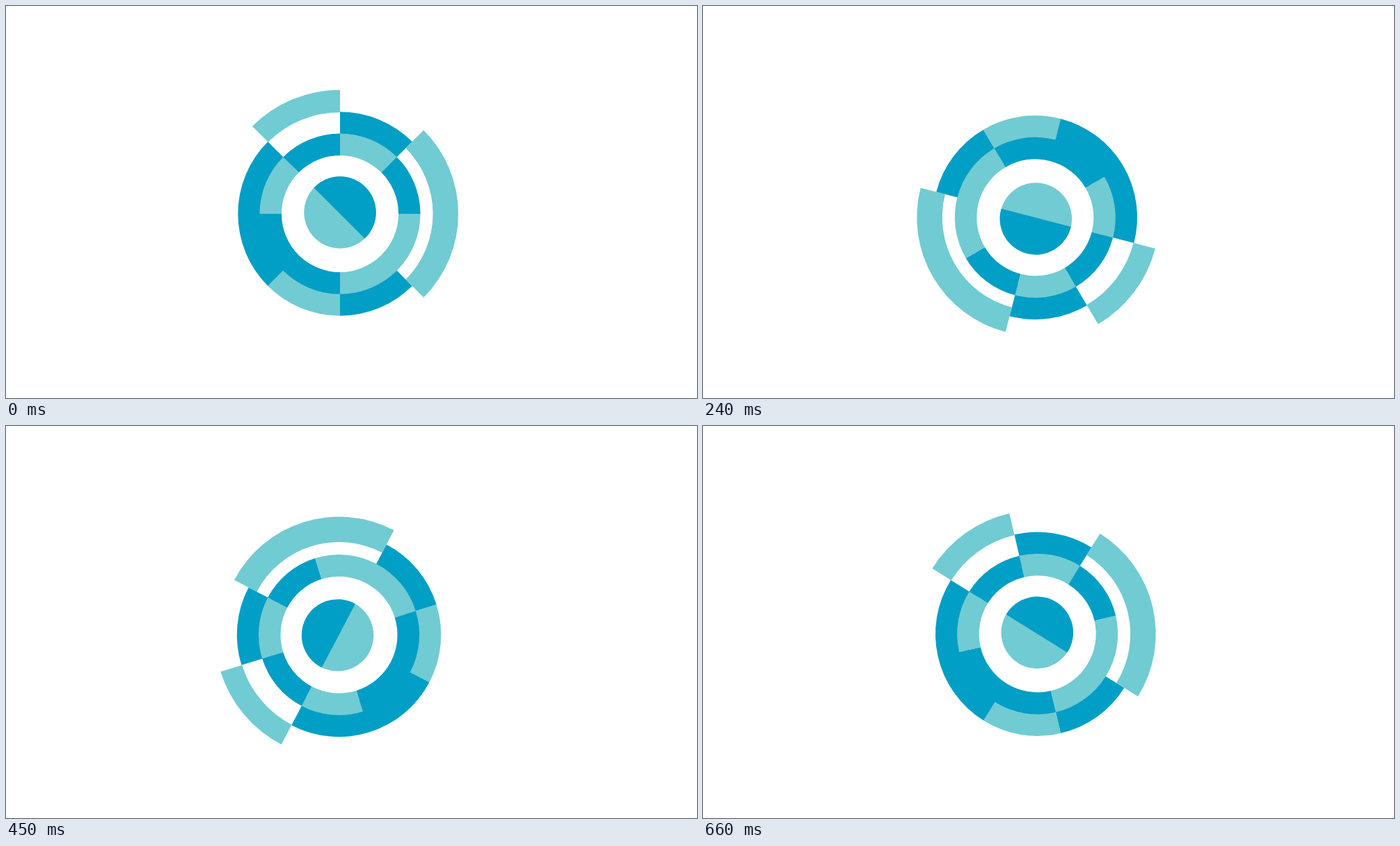
Write an HTML page with a canvas that moves like this. It is 993 px wide and 564 px high and loops after 0.69 s.

```html
<!DOCTYPE html>
<html lang="en">
<head>
<meta charset="utf-8">
<title>Spinning wheel</title>
<style>
  html, body { margin: 0; width: 100%; height: 100%; overflow: hidden; background: #fff; }
  canvas { display: block; }
</style>
</head>
<body>
<canvas width="993" height="564"></canvas>
<script>
const ctx = document.querySelector('canvas').getContext('2d');
const COLORS = { D: '#019ec6', L: '#71cbd2' };
const STEP = 30, STEPS = 23;
const HUB = { x: 480, y: 299 };

// Eight sectors clockwise from the top: D dark, L light, dot empty
const OUTER_RING = 'D..DLDD.';
const INNER_RING = 'LDLLDDLD';

// The wheel wobbles as it turns: step, rotation in degrees, hub offset x and y
const keys = [
  [0, 0, 0, 0],
  [3, 50.8, -0.8, -0.5],
  [6, 118.3, -0.5, 5.8],
  [11, 196.3, -6, 4.5],
  [15, 252.7, -1.5, 1.5],
  [18, 290.1, -8.4, 0.5],
  [22, 346.9, 0.7, 0.2],
  [STEPS, 360, 0, 0]
];

const rad = deg => deg * Math.PI / 180;

function poseAt(step) {
  const i = keys.findIndex(key => key[0] > step);
  const from = keys[i - 1], to = keys[i];
  const k = (step - from[0]) / (to[0] - from[0]);
  return from.map((v, n) => v + (to[n] - v) * k);
}

function wedge(color, inner, outer, start, end) {
  const a = rad(start - 90), b = rad(end - 90);
  ctx.fillStyle = COLORS[color];
  ctx.beginPath();
  ctx.arc(0, 0, outer, a, b);
  ctx.arc(0, 0, inner, b, a, true);
  ctx.fill();
}

// Neighbouring sectors of one colour are joined, so no seams show
function ring(pattern, inner, outer) {
  for (const { 0: run, index } of pattern.matchAll(/([DL])\1*/g)) {
    wedge(run[0], inner, outer, index * 45, (index + run.length) * 45);
  }
}

// The disc sits a little above the hub, but its colours split through the hub
function disc(y, radius) {
  ctx.beginPath();
  ctx.arc(0, y, radius, 0, rad(360));
  ctx.fillStyle = COLORS.L;
  ctx.fill();
  ctx.clip();
  wedge('D', 0, radius * 2, -45, 135);
}

function draw(ms) {
  const [, turn, dx, dy] = poseAt(Math.floor(ms / STEP) % STEPS);
  ctx.clearRect(0, 0, 993, 564);
  ctx.save();
  ctx.translate(HUB.x + dx, HUB.y + dy);
  ctx.rotate(rad(turn));
  ring(OUTER_RING, 100, 146.7);
  ring(INNER_RING, 84, 115.5);
  wedge('L', 133.5, 170, 45, 135);
  wedge('L', 146, 178.2, 315, 360);
  disc(-2, 51.7);
  ctx.restore();
}

function loop() {
  draw(performance.now());
  requestAnimationFrame(loop);
}
loop();
</script>
</body>
</html>
```
